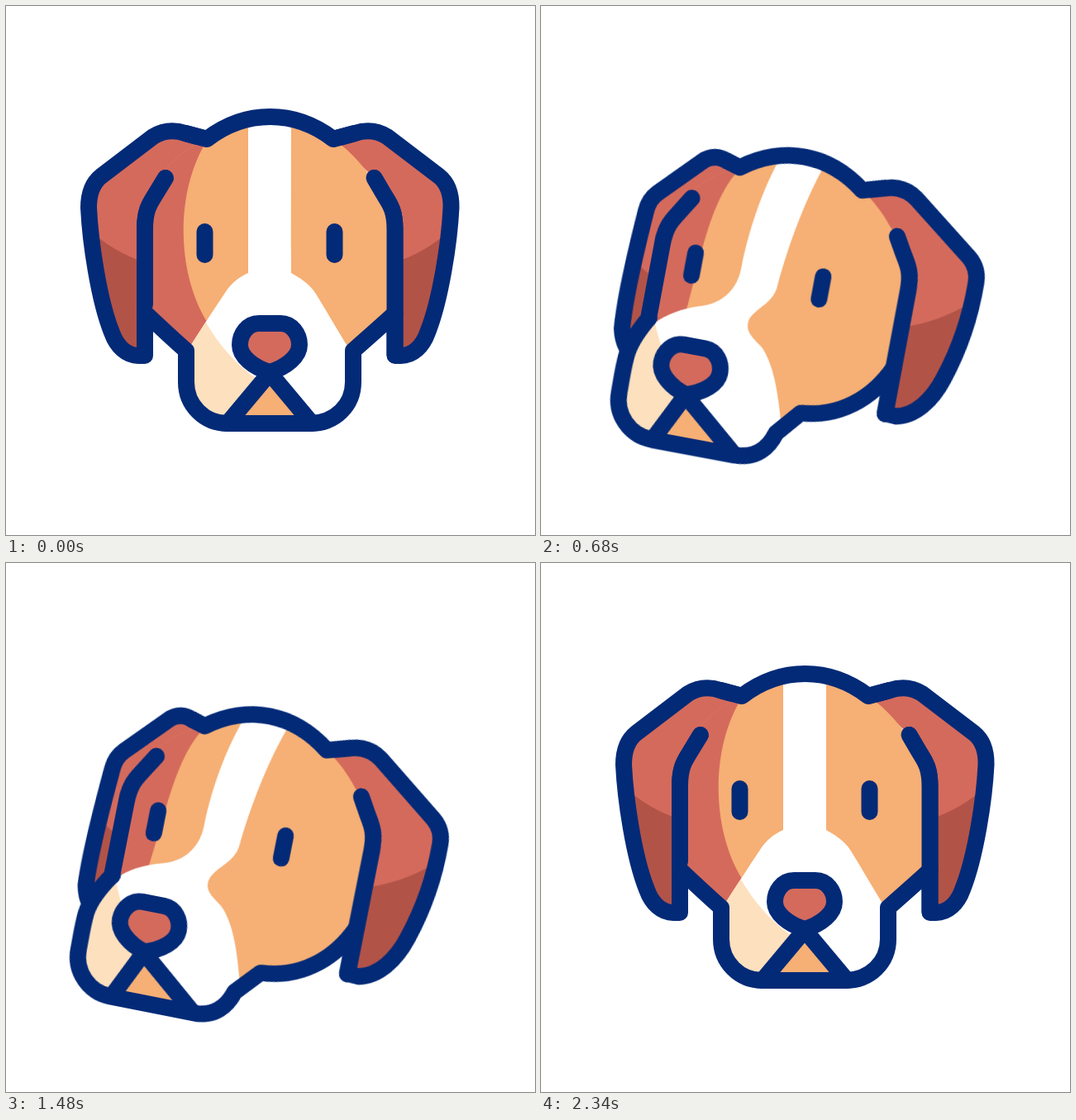
Animation, 640 px wide and 640 px high, one loop 2400 ms. Source, as an HTML page:

```html
<!DOCTYPE html>
<html lang="en">
<head>
<meta charset="utf-8">
<title>Dog turning its head</title>
<style>
html, body { margin: 0; width: 100%; height: 100%; overflow: hidden; background: #fff; }
svg { display: block; width: 100vw; height: 100vh; }

/* The whole head tilts while each part morphs from front (--a) to side (--b) */
#dog { transform-origin: 243px 161px; animation: tilt 2400ms infinite; }
@keyframes tilt {
  0% { transform: translate(0, 0) rotate(0deg); animation-timing-function: cubic-bezier(.8, 0, .17, 1); }
  45.83% { transform: translate(-3px, 40px) rotate(12.3deg); animation-timing-function: cubic-bezier(.82, 0, .15, 1); }
  95%, 100% { transform: translate(0, 0) rotate(0deg); }
}
path { d: var(--a); animation: turn 2400ms infinite; }
@keyframes turn {
  0% { d: var(--a); animation-timing-function: cubic-bezier(.8, 0, .17, 1); }
  45.83% { d: var(--b); animation-timing-function: cubic-bezier(.82, 0, .15, 1); }
  95%, 100% { d: var(--a); }
}

.line { fill: none; stroke: #032a77; stroke-width: 20; stroke-linecap: round; stroke-linejoin: round; }
.red { fill: #d46a5c; }
.dark { fill: #b25348; }
.tan { fill: #f6af74; }
.cream { fill: #fde0bd; }
.white { fill: #fff; }

.ear-l {
  --a: path("M243 161 L217 154 Q196 147 178 158 L115 206 Q100 218 100 244 C102 285 112 355 128 395 C134 412 146 423 160 423 L168 423 L168 270 C168 245 175 238 182 226 L193 208");
  --b: path("M243 161 L227 156 Q214 151 203 160 L157 210 Q149 219 148 231 C144 281 139 336 140.5 376 C144 393 152 404 162 406 L168 406 L168 270 C168 245 175 238 182 226 L193 208");
}
.ear-r {
  --a: path("M396 161 L422 154 Q443 147 461 158 L524 206 Q539 218 538.5 244 C536.5 285 526 355 510 395 C504 412 492 423 478 423 L470.5 423 L470.5 270 C470.5 245 463 238 456 226 L445.5 208");
  --b: path("M393.5 161 L420.5 153 Q442 146 460 159 L538 219 Q551 230 551.5 246 C553 292 546 329 536 362 C527 392 509 417 485 422 L470.5 421 L470.5 270 C470.5 245 463 238 456 226 L445.5 208");
}
.tip-l {
  --a: path("M100 270 Q130 298 168 310 L168 423 L160 423 C146 423 134 412 128 395 C112 350 104 310 100 270 Z");
  --b: path("M142 296 Q154 307 168 311 L168 406 L162 406 C152 404 144 393 140.5 376 C139 350 141 320 142 296 Z");
}
.tip-r {
  --a: path("M538.5 270 Q508.5 298 470.5 310 L470.5 423 L478 423 C492 423 504 412 510 395 C526 350 534.5 310 538.5 270 Z");
  --b: path("M551 269 Q514 302 470.5 316 L470.5 421 L485 422 C509 417 527 392 536 362 C546 329 551 300 551 269 Z");
}
.head {
  --a: path("M243 161 C290 125 349 125 396 161 C420 177 438 200 458 230 C466 245 470.5 255 470.5 270 L470.5 372 C454 387 437 402 420 417 L420 455 C420 483 398 505 368 505 L268 505 C240 505 218 483 218 455 C218 442 218 430 218 417 C201 402 185 387 168 371 L168 270 C168 215 200 180 243 161 Z");
  --b: path("M243 161 C290 125 346 125 393.5 161 C417 175 434 194 452 220 C463 240 470.5 255 470.5 270 L470.5 364 C451 411 412 442 362 443 L333 471 C327 488 316 504 290 504 L188 504 C160 504 138.5 482 138.5 455 C138.5 442 137.5 425 139 410 C143 391 156 373 169 358 L168 270 C168 215 200 180 243 161 Z");
}
.jaw {
  --a: path("M470.5 372 C454 387 437 402 420 417 L420 455 C420 483 398 505 368 505 L268 505 C240 505 218 483 218 455 C218 442 218 430 218 417 C201 402 185 387 168 371");
  --b: path("M470.5 364 C451 411 412 442 362 443 L333 471 C327 488 316 504 290 504 L188 504 C160 504 138.5 482 138.5 455 C138.5 442 137.5 425 139 410 C143 391 156 373 169 358");
}
.crown {
  --a: path("M217 154 L243 161 C290 125 349 125 396 161 L422 154");
  --b: path("M227 156 L243 161 C290 125 346 125 393.5 161 L420.5 153");
}
.fold-l {
  --a: path("M168 361 L168 270 C168 245 175 238 182 226 L193 208");
  --b: var(--a);
}
.fold-r {
  --a: path("M470.5 422 L470.5 270 C470.5 245 463 238 456 226 L445.5 208");
  --b: var(--a);
}
.shade {
  --a: path("M245 160 C205 220 205 320 243 382 L222 430 L150 430 L150 160 Z");
  --b: path("M245 160 C216 202 219 268 206 337 L190 375 L150 400 L150 160 Z");
}
.blaze {
  --a: path("M293 130 C293 190 293 260 293 323 C280 329 272 336 265 347 C251 368 236 391 222 413 L190 440 L190 520 L440 520 L414 413 C402 394 389 371 376 350 C371 341 362 332 345 323 C345 318 345 310 345 300 C345 250 345 180 345 130 Z");
  --b: path("M293 130 C271 176 263 237 263 273 C265 309 243 328 219 333 C199 337 181 345 168 358 L100 410 L110 520 L335 520 L336 455 C326 418 315 388 298 373 C285 364 271 358 279 341 C287 324 307 316 309 294 C312 260 322 190 347 130 Z");
}
.cheek {
  --a: path("M228 355 C245 395 272 430 305 452 L268 510 L200 520 L180 440 Z");
  --b: path("M160 342 C167 369 183 403 216 450 L184 512 L125 520 L110 400 Z");
}
.mouth {
  --a: path("M319 444 L268 505 L370 505 Z");
  --b: path("M214.5 444 L188.5 504 L289.5 504 Z");
}
.nose {
  --a: path("M306 384 L332 384 C346 384 355 397 355 410 C355 424 339 437 319 443 C299 437 283 424 283 410 C283 397 292 384 306 384 Z");
  --b: path("M201.5 384 L227.5 384 C241.5 384 250.5 397 250.5 410 C250.5 424 234.5 437 214.5 443 C194.5 437 178.5 424 178.5 410 C178.5 397 187.5 384 201.5 384 Z");
}
.eye-l { --a: path("M240.5 273 L240.5 301"); --b: path("M204.5 272 L204.5 300"); }
.eye-r { --a: path("M397.5 273 L397.5 301"); --b: path("M361.5 272 L361.5 300"); }
</style>
</head>
<body>
<svg viewBox="0 0 640 640">
  <defs>
    <clipPath id="in-head"><path class="head"/></clipPath>
    <clipPath id="in-blaze"><path class="blaze"/></clipPath>
  </defs>

  <g id="dog">
    <path class="ear-l red"/>
    <path class="tip-l dark"/>
    <path class="ear-l line"/>
    <path class="ear-r red"/>
    <path class="tip-r dark"/>
    <path class="ear-r line"/>

    <g clip-path="url(#in-head)">
      <path class="head tan"/>
      <path class="shade red"/>
      <path class="blaze white"/>
      <g clip-path="url(#in-blaze)"><path class="cheek cream"/></g>
    </g>

    <path class="mouth tan"/>
    <path class="nose red"/>
    <g class="line">
      <path class="jaw"/>
      <path class="crown"/>
      <path class="fold-l"/>
      <path class="fold-r"/>
      <path class="mouth"/>
      <path class="nose"/>
      <path class="eye-l"/>
      <path class="eye-r"/>
    </g>
  </g>
</svg>
</body>
</html>
```
